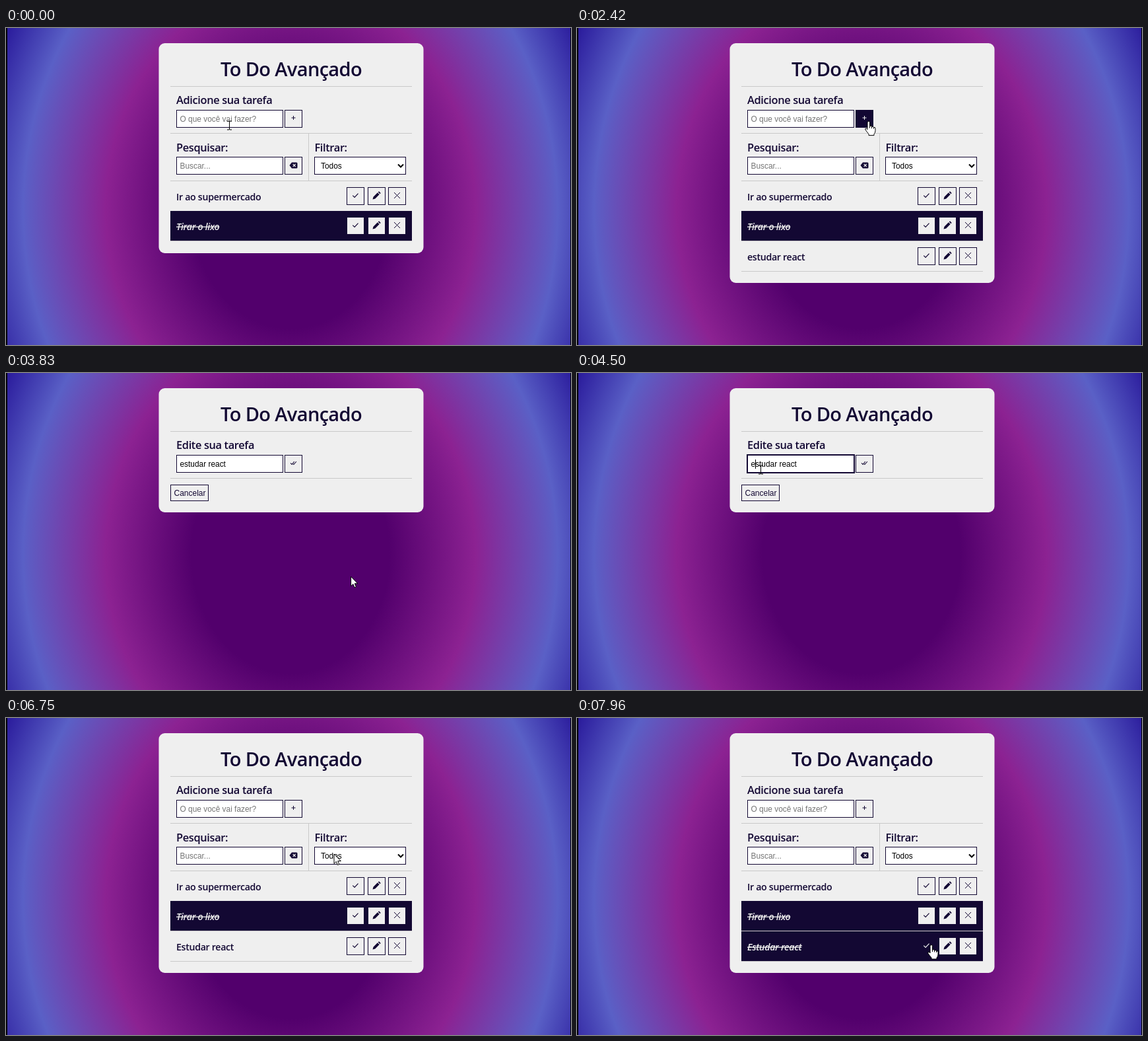
Animation, 856 px wide and 480 px high, one loop 8000 ms. Source, as an HTML page with a canvas:

```html
<!DOCTYPE html>
<html lang="pt-BR">
<head>
<meta charset="utf-8">
<title>To Do Avançado</title>
<style>
html, body { margin: 0; width: 100%; height: 100%; overflow: hidden; background: #000; }
canvas { display: block; width: 856px; height: 480px; }
</style>
</head>
<body>
<canvas id="stage" width="856" height="480"></canvas>
<script>
const ctx = document.getElementById('stage').getContext('2d');
const LOOP = 8000;
const INK = '#130833', PAPER = '#efefef', LINE = '#c9c9c9';
const UI = '"Open Sans", "Noto Sans", sans-serif';
const FIELD = '"Liberation Sans", sans-serif';

// Moments of the interaction, in ms
const T = { focus: 250, type: 880, add: 2250, edit: 3620, refocus: 4300,
  erase: 4740, capital: 4940, blur: 5700, save: 5870, done: 7620 };

// Pointer path: time, x, y
const PATH = [
  [0, 338, 147], [1800, 338, 147], [2180, 442, 141], [2600, 442, 142],
  [3360, 572, 341], [3680, 572, 341], [4260, 278, 146], [5080, 278, 146],
  [5620, 446, 136], [5980, 446, 136], [6680, 497, 206], [6800, 497, 206],
  [7500, 537, 344], [8000, 537, 344]
];

const HAND = new Path2D('M-2 1.5Q-2-.5 0-.5Q1.5-.5 1.5 1.5V7Q4 5.5 4.5 8Q7 6.5 7.5 9Q10 8 10 10.5V14Q10 17 8 19V21H0V19Q-3 15.5-5 12.5Q-6 10-3.5 10.5L-2 12Z');
const ARROW = new Path2D('M0 0V14.5L3.3 11.4L5.4 16.5L7.8 15.5L5.7 10.6H10.3Z');
const IBEAM = new Path2D('M-3.5-6.5H-1Q0-6.5 0-5.5Q0-6.5 1-6.5H3.5M0-5.5V5.5M-3.5 6.5H-1Q0 6.5 0 5.5Q0 6.5 1 6.5H3.5');
const ICONS = {
  check: { d: 'M-4.2-.8L-1.4 2L4-3.8', w: 1.2 },
  cross: { d: 'M-4.5-5.5L4.5 3.5M4.5-5.5L-4.5 3.5', w: 1 },
  plus: { d: 'M-3-1.5H3M0-4.5V1.5', w: 1 },
  double: { d: 'M-4.5-1.2L-2.3 1L1.2-3.5M-.6.1L.4 1L4.4-3.5', w: 1.1 },
  pencil: { d: 'M-6 5L-5 1.2L1.4-5.2L4.2-2.4L-2.2 4ZM2.2-6L3.6-7.2L6.2-4.6L5-3.2Z' },
  erase: { d: 'M-6-.5L-2.5-5H4.5Q6-5 6-3.5V2.5Q6 4 4.5 4H-2.5Z' }
};
for (const icon of Object.values(ICONS)) icon.path = new Path2D(icon.d);

const background = ctx.createRadialGradient(0, 0, 0, 0, 0, 500);
[[0, '#52006c'], [.3, '#52006c'], [.56, '#8c2292'], [.81, '#5a60c6'], [.98, '#28189a'], [1, '#28189a']]
  .forEach(([at, color]) => background.addColorStop(at, color));

function pointerAt(t) {
  const i = Math.max(1, PATH.findIndex(p => p[0] > t));
  const [t0, x0, y0] = PATH[i - 1], [t1, x1, y1] = PATH[i];
  const k = (t - t0) / (t1 - t0), e = k * k * (3 - 2 * k);
  return { x: x0 + (x1 - x0) * e, y: y0 + (y1 - y0) * e, kind: 'arrow' };
}

function over(p, x, y, w, h) {
  return p.x >= x && p.x <= x + w && p.y >= y && p.y <= y + h;
}

function rect(x, y, w, h, color) {
  ctx.fillStyle = color;
  ctx.fillRect(x, y, w, h);
}

function box(x, y, w, h, fill, border = 1) {
  rect(x, y, w, h, INK);
  rect(x + border, y + border, w - 2 * border, h - 2 * border, fill);
}

function label(text, x, y, size, color = INK, style = '') {
  ctx.font = `${style} 600 ${size}px ${UI}`;
  ctx.letterSpacing = `${-0.022 * size}px`;
  ctx.fillStyle = color;
  ctx.fillText(text, x, y);
  const width = ctx.measureText(text).width;
  ctx.letterSpacing = '0px';
  return width;
}

function plain(text, x, y, color, size = 11.9) {
  ctx.font = `${size}px ${FIELD}`;
  ctx.fillStyle = color;
  ctx.fillText(text, x, y);
}

function icon(name, x, y, color, hole) {
  const { path, w } = ICONS[name];
  ctx.save();
  ctx.translate(x, y);
  ctx.fillStyle = ctx.strokeStyle = color;
  ctx.lineWidth = w || 1;
  if (w) ctx.stroke(path); else ctx.fill(path);
  if (name === 'erase') {
    ctx.strokeStyle = hole;
    ctx.lineWidth = 1.2;
    ctx.stroke(new Path2D('M-.8-2.5L3.2 1.5M3.2-2.5L-.8 1.5'));
  }
  ctx.restore();
}

function button(name, x, y, p) {
  const hot = over(p, x, y, 27, 27);
  if (hot) p.kind = 'hand';
  const fill = hot ? INK : PAPER;
  box(x, y, 27, 27, fill);
  icon(name, x + 13.5, y + 13.5, hot ? PAPER : INK, fill);
}

function input(y, value, hint, p, caret = -1, since = 0) {
  const focused = caret >= 0;
  if (over(p, 258, y, 162, 27)) p.kind = 'text';
  if (focused) box(257, y - 1, 164, 29, '#fff', 2);
  else box(258, y, 162, 27, '#fff');
  plain(value || hint, 263.5, y + 18, value ? '#000' : '#757575');
  if (focused && since % 1000 < 500) {
    const x = 263.5 + ctx.measureText(value.slice(0, caret)).width;
    rect(Math.round(x), y + 7, 1, 14, '#000');
  }
}

function drawBackground() {
  ctx.save();
  ctx.translate(431, 275);
  ctx.scale(1, 1.2);
  rect(-431, -275, 856, 480, background);
  ctx.restore();
  rect(0, 0, 2, 480, '#000');
  rect(855, 0, 1, 480, '#000');
}

function drawCard(bottom, heading) {
  ctx.fillStyle = PAPER;
  ctx.beginPath();
  ctx.roundRect(231.5, 23, 401, bottom - 23, 9);
  ctx.fill();
  ctx.textAlign = 'center';
  label('To Do Avançado', 432, 72.5, 29);
  ctx.textAlign = 'left';
  rect(249, 88, 366, 1, LINE);
  label(heading, 258, 115, 16.4);
  rect(249, 159, 366, 1, LINE);
}

function drawTask(i, name, done, p) {
  const top = 232 + Math.round(i * 45.4);
  if (done) rect(249, top, 366, 45, INK);
  rect(249, top + 45, 366, 1, LINE);
  const color = done ? PAPER : INK;
  const width = label(name, 258, top + 28.5, 14.2, color, done ? 'italic' : '');
  if (done) rect(258, top + 23.5, width, 1.3, color);
  ['check', 'pencil', 'cross'].forEach((kind, n) => {
    button(kind, [516, 548, 579][n], top + 9, p);
  });
}

function drawList(t, p) {
  const tasks = [['Ir ao supermercado', false], ['Tirar o lixo', true]];
  if (t >= T.add) tasks.push([t < T.save ? 'estudar react' : 'Estudar react', t >= T.done]);
  drawCard(tasks.length > 2 ? 386 : 341, 'Adicione sua tarefa');

  const count = Math.max(0, Math.floor((t - T.type) / 70));
  const typed = t < T.add ? 'estudar react'.slice(0, count) : '';
  const focused = t >= T.focus && t < T.add - 60;
  const since = count > 0 && count < 13 ? 0 : t - T.focus;
  input(124, typed, 'O que você vai fazer?', p, focused ? typed.length : -1, since);
  button('plus', 422, 124, p);

  label('Pesquisar:', 258, 186.5, 16.4);
  input(195, '', 'Buscar...', p);
  button('erase', 422, 195, p);
  rect(458, 160, 1, 72, LINE);
  label('Filtrar:', 467.5, 186.5, 16.4);
  box(467, 195, 139, 27, '#fff');
  plain('Todos', 477, 213, '#000');
  ctx.strokeStyle = '#000';
  ctx.lineWidth = 2;
  ctx.stroke(new Path2D('M594 206.5L598 210.5L602 206.5'));
  rect(249, 231, 366, 1, LINE);
  tasks.forEach(([name, done], i) => drawTask(i, name, done, p));
}

function drawEdit(t, p) {
  drawCard(211, 'Edite sua tarefa');
  const first = t < T.erase ? 'e' : t < T.capital ? '' : 'E';
  const focused = t >= T.refocus && t < T.blur;
  input(124, first + 'studar react', '', p, focused ? first.length : -1, t - T.refocus);
  button('double', 422, 124, p);
  box(249, 169, 58, 25, PAPER);
  plain('Cancelar', 254.5, 185.5, INK, 12);
}

function drawPointer(p) {
  ctx.save();
  ctx.translate(p.x, p.y);
  ctx.lineWidth = 1;
  ctx.lineJoin = 'round';
  ctx.strokeStyle = '#000';
  if (p.kind === 'text') {
    ctx.translate(.5, .5);
    ctx.stroke(IBEAM);
  } else {
    const shape = p.kind === 'hand' ? HAND : ARROW;
    ctx.fillStyle = '#fff';
    ctx.fill(shape);
    ctx.stroke(shape);
    if (p.kind === 'hand') ctx.stroke(new Path2D('M1.5 7V10M4.5 8V10.5M7.5 9V11'));
  }
  ctx.restore();
}

function frame(now) {
  const t = now % LOOP;
  const p = pointerAt(t);
  drawBackground();
  if (t >= T.edit && t < T.save) drawEdit(t, p);
  else drawList(t, p);
  drawPointer(p);
  requestAnimationFrame(frame);
}
requestAnimationFrame(frame);
</script>
</body>
</html>
```
